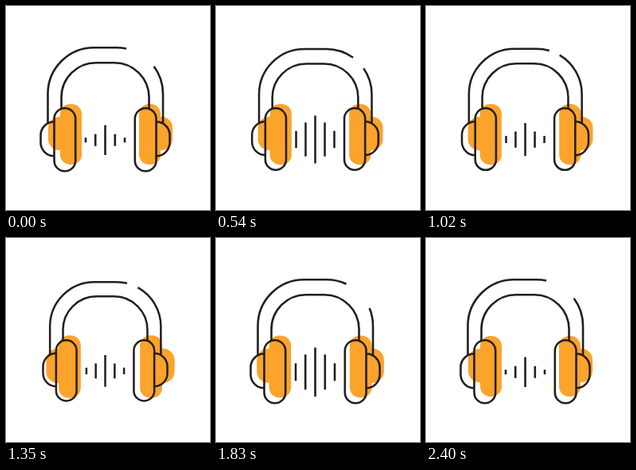
An HTML page for the animation above (2.43 s loop, 256x256 px).

```html
<!DOCTYPE html>
<html>
<head>
<meta charset="utf-8">
<title>Headphones</title>
<style>
  html, body { margin: 0; height: 100%; overflow: hidden; background: #fff; }
  svg { display: block; width: 100%; height: 100%; }
</style>
</head>
<body>
<svg viewBox="0 0 256 256">
  <defs>
    <g id="cup">
      <rect x="60.5" y="128.3" width="26.7" height="79" rx="13.3"/>
      <path d="M60.5 145.3A17 17 0 0 0 43.5 162.3V171.3A17 17 0 0 0 60.5 188.3"/>
    </g>
    <g id="fill">
      <rect x="68" y="123" width="27" height="76" rx="12.5"/>
      <path d="M80 139H67A14 14 0 0 0 53 153V167A14 14 0 0 0 67 181H80Z"/>
    </g>
  </defs>
  <g id="fills" fill="#fca32c">
    <use href="#fill"/>
    <use href="#fill" transform="translate(262) scale(-1 1)"/>
  </g>
  <g id="lines" fill="none" stroke="#231f20" stroke-width="2.6">
    <use href="#cup"/>
    <use href="#cup" transform="translate(249) scale(-1 1)"/>
    <path d="M69.5 130V114.500A43.500 43.500 0 0 1 113 71.200H136A43.500 43.500 0 0 1 179.500 114.500V130"/>
    <path id="band"/>
    <path id="bars"/>
  </g>
</svg>
<script>
const LOOP = 2430, STEP = 30;
const $ = id => document.getElementById(id);

// Tracks are [time, value] pairs, eased in and out between keys.
const lineScale = [[0, 1], [270, 1.05], [560, .978], [810, 1.025], [1040, .98], [1215, 1],
  [1520, .91], [1825, 1], [2110, .891], [2400, 1]];
const fillScale = [[0, 1], [270, 1.09], [560, 1.004], [810, 1.068], [1040, 1.004], [1290, 1.042],
  [1500, .99], [1700, 1.04], [2120, .963], [2400, 1]];
const gapStart = [[0, 12], [540, 36], [1150, 14], [1350, 14], [1850, 25], [2400, 12]];
const gapEnd = [[0, 53.5], [540, 55], [1140, 28], [1300, 28], [1830, 67.5], [2400, 53.5]];

function sample(track, t) {
  const i = track.findIndex(key => key[0] > t);
  if (i < 0) return track[track.length - 1][1];
  const [t0, a] = track[i - 1], [t1, b] = track[i];
  return a + (b - a) * (1 - Math.cos(Math.PI * (t - t0) / (t1 - t0))) / 2;
}

const scaleAbout = (x, y, s) => `translate(${x} ${y}) scale(${s}) translate(${-x} ${-y})`;

// Point on the band's right shoulder, in degrees clockwise from the top.
function shoulder(deg) {
  const a = deg * Math.PI / 180;
  return `${139 + 58 * Math.sin(a)} ${110.3 - 58 * Math.cos(a)}`;
}

function draw(t) {
  $('lines').setAttribute('transform', scaleAbout(124.5, 130, sample(lineScale, t)));
  $('fills').setAttribute('transform', scaleAbout(131, 147, sample(fillScale, t)));
  $('band').setAttribute('d',
    `M52.5 147V110.3A58 58 0 0 1 110.5 52.3H139A58 58 0 0 1 ${shoulder(sample(gapStart, t))}` +
    `M${shoulder(sample(gapEnd, t))}A58 58 0 0 1 197 110.3V147`);

  const level = (1 - Math.cos(2 * Math.PI * (t / LOOP * 2 + .015))) / 2;
  const bar = (x, low, high) => {
    const h = low + (high - low) * level;
    return `M${x} ${168.3 - h / 2}v${h}`;
  };
  $('bars').setAttribute('d', [[0, 37.5, 61.5], [12.3, 15, 44], [24.5, 6, 22]]
    .map(([dx, low, high]) => bar(124.5 - dx, low, high) + (dx ? bar(124.5 + dx, low, high) : ''))
    .join(''));
}

const start = performance.now();
function frame() {
  const t = (performance.now() - start) % LOOP;
  draw(Math.floor(t / STEP) * STEP);
  requestAnimationFrame(frame);
}
frame();
</script>
</body>
</html>
```
